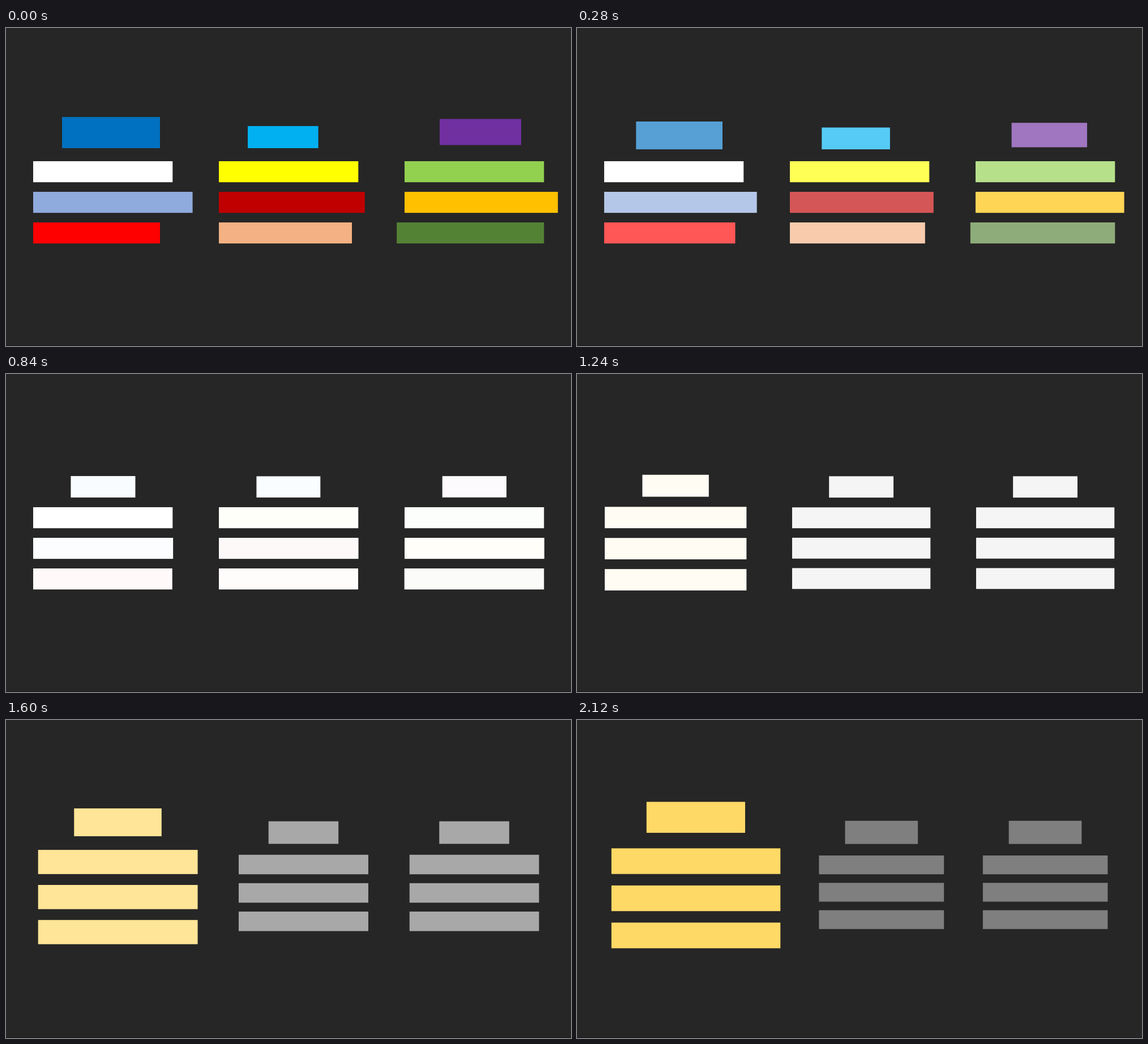
Recreate the animation shown at these times as an HTML page with a canvas. Size 998x561 px, loop 2280 ms.

```html
<!DOCTYPE html>
<html>
<head>
<meta charset="utf-8">
<style>
  html, body { margin: 0; height: 100%; overflow: hidden; background: #262626; }
  canvas { display: block; }
</style>
</head>
<body>
<canvas id="stage" width="998" height="561"></canvas>
<script>
const ctx = document.getElementById('stage').getContext('2d');
const LOOP = 2280, STEP = 40, MOVE = 960, STARTS = [40, 1160];
const WHITE = [255, 255, 255], GOLD = [255, 217, 102], GRAY = [127, 127, 127];

// Each bar is [left, top, right, bottom, r, g, b].
const hex = n => [n >> 16, n >> 8 & 255, n & 255];
const bar = (left, top, right, bottom, color) => [left, top, right, bottom, ...color];

// A column: one header above three equal rows.
function column(left, right, header, top, height, pitch, color) {
  const rows = [0, 1, 2].map(i =>
    bar(left, top + i * pitch, right, top + i * pitch + height, color));
  return [bar(...header, color), ...rows];
}

const row = (i, left, right, color) =>
  bar(left, 235 + 54 * i, right, 272.1 + 54 * i, hex(color));

const messy = [
  bar(99, 157, 272, 212, hex(0x0070c0)),
  row(0, 48, 294.3, 0xffffff),
  row(1, 48, 329.6, 0x8faadc),
  row(2, 48, 272, 0xff0000),

  bar(427, 173, 551.6, 212, hex(0x00b0f0)),
  row(0, 376, 622.3, 0xffff00),
  row(1, 376, 633.7, 0xc00000),
  row(2, 376, 611, 0xf4b183),

  bar(766, 160.5, 910, 206.5, hex(0x7030a0)),
  row(0, 704, 950.3, 0x92d050),
  row(1, 704, 974.8, 0xffc000),
  row(2, 690.2, 950.3, 0x548235)
];

const aligned = [48, 376, 704].flatMap(x =>
  column(x, x + 246.3, [x + 66.8, 180.6, x + 179.4, 218], 235, 37.1, 54, WHITE));

const focused = [
  ...column(60.8, 359.3, [122.8, 144.4, 297, 199], 226.4, 45.3, 65.5, GOLD),
  ...column(427.4, 648.2, [473.5, 177.8, 602.1, 218.7], 239, 33.2, 48.3, GRAY),
  ...column(716.9, 937.4, [762.7, 177.8, 891.4, 218.7], 239, 33.2, 48.3, GRAY)
];

const bezier = (s, a, b) => 3 * (1 - s) ** 2 * s * a + 3 * (1 - s) * s * s * b + s ** 3;

// Quick start, long soft landing.
function ease(x) {
  if (x <= 0) return 0;
  if (x >= 1) return 1;
  let lo = 0, hi = 1;
  for (let i = 0; i < 24; i++) {
    const mid = (lo + hi) / 2;
    if (bezier(mid, 0.288, 0.411) < x) lo = mid; else hi = mid;
  }
  return bezier(lo, 0.2, 1);
}

function draw(time) {
  const t = Math.floor(time % LOOP / STEP) * STEP;
  const second = t >= STARTS[1];
  const [from, to] = second ? [aligned, focused] : [messy, aligned];
  const p = ease((t - STARTS[+second]) / MOVE);

  ctx.fillStyle = '#262626';
  ctx.fillRect(0, 0, 998, 561);
  ctx.fillStyle = '#151515';
  ctx.fillRect(0, 560, 998, 1);

  from.forEach((a, i) => {
    const [l, top, r, b, ...color] = a.map((v, k) => v + (to[i][k] - v) * p);
    ctx.fillStyle = `rgb(${color.map(Math.round)})`;
    ctx.fillRect(l, top, r - l, b - top);
  });
}

const begin = performance.now();
function tick() {
  draw(performance.now() - begin);
  requestAnimationFrame(tick);
}
tick();
</script>
</body>
</html>
```
